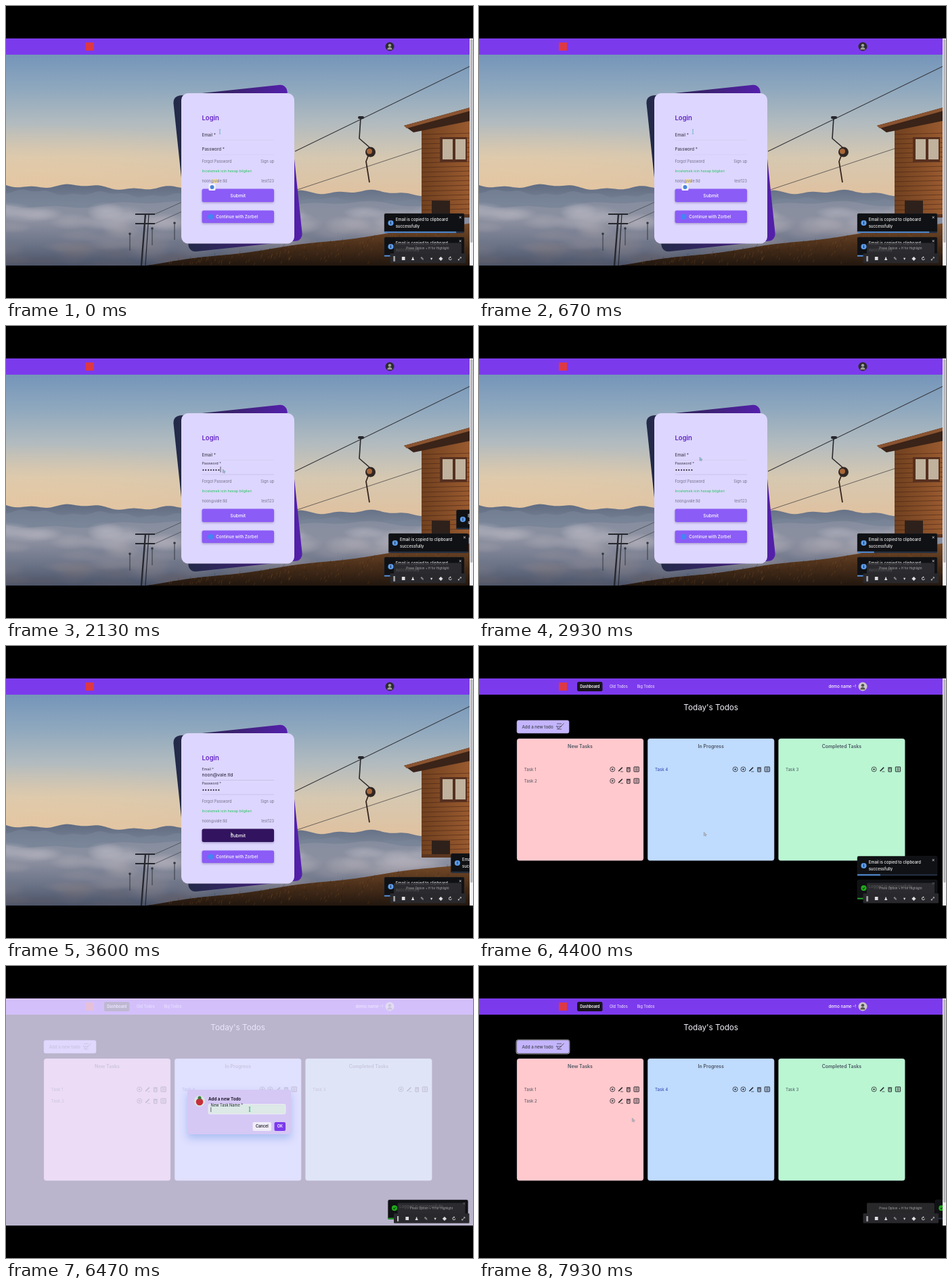
Animation, 690 px wide and 432 px high, one loop 8 s. Source, as an HTML page with a canvas:

```html
<!DOCTYPE html>
<html lang="en">
<head>
<meta charset="utf-8">
<title>Todo login</title>
<style>
html, body { margin: 0; width: 100%; height: 100%; overflow: hidden; background: #000; }
canvas { display: block; }
</style>
</head>
<body>
<canvas id="stage" width="690" height="432"></canvas>
<script>
const stage = document.getElementById('stage');
let c = stage.getContext('2d');
const LOOP = 8000, DASHBOARD_AT = 4130, OPEN_AT = 5850, CLOSE_AT = 7350;
const TOP = 48, NAV_BOTTOM = 72, BOTTOM = 384, WIDTH = 690;
const EMAIL = 'noon@vale.tld', USER = 'demo name';

const ramp = (t, from, duration) => Math.max(0, Math.min(1, (t - from) / duration));
const smooth = p => p * p * (3 - 2 * p);
const mix = (a, b, p) => a + (b - a) * p;
const random = (seed => () => (seed = seed * 16807 % 2147483647) / 2147483647)(71);

function paint(fill, stroke, width = 0.8) {
  if (fill) { c.fillStyle = fill; c.fill(); }
  if (stroke) { c.strokeStyle = stroke; c.lineWidth = width; c.stroke(); }
}
function rect(x, y, w, h, fill, r = 0, stroke, width) {
  c.beginPath();
  c.roundRect(x, y, w, h, r);
  paint(fill, stroke, width);
}
function disc(x, y, r, fill, stroke, width) {
  c.beginPath();
  c.arc(x, y, r, 0, 7);
  paint(fill, stroke, width);
}
function trace(points) {
  c.beginPath();
  for (let i = 0; i < points.length; i += 2) c.lineTo(points[i], points[i + 1]);
}
function poly(fill, ...points) { trace(points); paint(fill); }
function line(stroke, width, ...points) { trace(points); paint(null, stroke, width); }
function text(s, x, y, size, fill, weight = 400, align = 'left') {
  c.font = `${weight} ${size}px Inter, "DejaVu Sans", sans-serif`;
  c.textAlign = align;
  c.fillStyle = fill;
  c.fillText(s, x, y);
}
function gradient(x0, y0, x1, y1, ...stops) {
  const g = c.createLinearGradient(x0, y0, x1, y1);
  stops.forEach((color, i) => g.addColorStop(i / (stops.length - 1), color));
  return g;
}
function glow(x, y, rx, ry, rgb, alpha) {
  c.save();
  c.translate(x, y);
  c.scale(rx, ry);
  const g = c.createRadialGradient(0, 0, 0, 0, 0, 1);
  g.addColorStop(0, `rgba(${rgb},${alpha})`);
  g.addColorStop(0.5, `rgba(${rgb},${alpha * 0.65})`);
  g.addColorStop(1, `rgba(${rgb},0)`);
  c.fillStyle = g;
  c.fillRect(-1, -1, 2, 2);
  c.restore();
}
// Fills everything below the curve y = height(x).
function ridge(fill, height) {
  c.beginPath();
  c.moveTo(0, BOTTOM);
  for (let x = 0; x <= WIDTH; x += 3) c.lineTo(x, height(x));
  c.lineTo(WIDTH, BOTTOM);
  paint(fill);
}

function paintSky() {
  rect(0, NAV_BOTTOM, WIDTH, 312, gradient(0, NAV_BOTTOM, 0, 275, '#7495ba', '#8fa8be', '#b2bbbf', '#d6c8b1', '#dfc2a1'));
  glow(40, 250, 330, 75, '240,205,160', 0.4);
  const peaks = x => 265 + x * 0.02 + 2.5 * Math.sin(x / 23) + 1.5 * Math.sin(x / 8);
  ridge(gradient(0, 262, 0, 296, '#5f6a80', '#7c8799'), peaks);
  ridge('rgba(122,134,154,.6)', x => peaks(x * 1.3 + 60) + 8);
  ridge(gradient(0, 288, 0, BOTTOM, 'rgba(150,152,166,.4)', '#8a8e9e', '#6c7488', '#4a5368'),
    x => 294 + 4 * Math.sin(x / 47) + 2 * Math.sin(x / 15));
  for (let i = 0; i < 110; i++) {
    const depth = i / 110, tone = Math.round(mix(208, 92, depth));
    glow(random() * 640, mix(297, 378, depth) + random() * 14, mix(22, 50, random()), mix(8, 15, random()),
      `${tone},${tone - 4},${tone + 6}`, 0.38);
  }
}

function paintHill() {
  const height = x => Math.min(BOTTOM, BOTTOM - 0.13 * (x - 200) + Math.sin(x / 25));
  ridge(gradient(0, 320, 0, BOTTOM, '#7a4c28', '#4e311b', '#22170f'), height);
  for (let i = 0; i < 260; i++) {
    const x = mix(240, 685, random()), y = mix(height(x), BOTTOM, random());
    line(i % 2 ? 'rgba(151,100,45,.35)' : 'rgba(31,22,13,.35)', 0.7, x, y, x + 1.5, y - 4);
  }
}

function paintSkiLift() {
  const dark = '#26282e';
  line('#343439', 1.1, 690, 87, 427, 215);
  line('#494746', 0.8, 614, 211, 427, 273);
  line(dark, 2.4, 206, 308, 200, BOTTOM);
  line(dark, 1.2, 211, 308, 206, BOTTOM);
  for (const y of [308, 322]) {
    line(dark, 2, 191, y, 220, y);
    line('#464953', 0.8, 220, y, 260, y - 18);
  }
  for (let i = 0; i < 3; i++) {
    const x = 183 + i * 33, y = 337 - i * 8;
    line('#343841', 1, x, y, x, y + 25);
    disc(x, y, 1.8, '#343841');
  }
  rect(520, 163, 9, 4, dark, 2);
  line('#29272a', 1.6, 524, 165, 522, 196, 537, 209);
  disc(538.5, 216, 7.5, '#302723');
  disc(537, 215, 4, '#a8663a');
  line('#38271f', 1.8, 535, 222, 532, 230, 537, 261);
}

function paintHut() {
  poly(gradient(614, 0, WIDTH, 0, '#70401f', '#9c5c30'), 614, 180, WIDTH, 160, WIDTH, 310, 614, 310);
  for (let y = 190; y < 308; y += 7) line('rgba(65,33,21,.6)', 0.9, 614, y, WIDTH, y - 2);
  poly('#3a2318', 588, 177, WIDTH, 149, WIDTH, 169, 602, 187);
  poly('#8a5431', 588, 177, WIDTH, 149, WIDTH, 154, 592, 181);
  rect(641, 194, 40, 37, '#57301f');
  for (const x of [645, 664]) rect(x, 197, 15, 30, '#c0b29d');
  rect(629, 288, 27, 24, '#2e211b');
  rect(614, 308, 76, 5, '#5a3620');
}

function paintScenery() {
  const canvas = document.createElement('canvas');
  canvas.width = stage.width;
  canvas.height = stage.height;
  const main = c;
  c = canvas.getContext('2d');
  paintSky();
  paintHill();
  paintSkiLift();
  paintHut();
  c = main;
  return canvas;
}
const scenery = paintScenery();

function avatar(light) {
  const ink = light ? '#57534f' : '#a39d98';
  disc(567, 60, 6.5, light ? '#c9c8ca' : '#292d30');
  disc(567, 58.3, 2.2, ink);
  c.beginPath();
  c.arc(567, 64.5, 3.6, Math.PI, 0);
  paint(ink);
}

function navbar(loggedIn) {
  rect(0, TOP, WIDTH, NAV_BOTTOM - TOP, '#7c3aed');
  rect(118, 54, 12, 12, '#df3843');
  avatar(loggedIn);
  if (!loggedIn) return;
  rect(145, 53, 37.5, 14, '#18151f', 2.5);
  text('Dashboard', 163.8, 61.9, 5.5, '#fff', 600, 'center');
  text('Old Todos', 193, 61.9, 5.5, '#e4d8ff', 500);
  text('Big Todos', 233.5, 61.9, 5.5, '#e4d8ff', 500);
  text(USER + ' -!', 557, 62, 6.1, '#fff', 500, 'right');
}

function field(label, y, value, size) {
  if (value) {
    text(label, 289.5, y - 7, 5.2, '#4d4860', 500);
    text(value, 289.5, y + 2.4, size, '#211c30');
  } else text(label, 289.5, y + 2, 6.1, '#454153', 500);
  line(value ? '#bdb5d7' : '#d3cbee', 0.6, 289.5, y + 7.5, 396, y + 7.5);
}

function formButton(y, h, fill) {
  c.save();
  c.shadowColor = 'rgba(50,30,100,.3)';
  c.shadowBlur = 3;
  c.shadowOffsetY = 1.5;
  rect(289.5, y, 106.5, h, fill, 2.5);
  c.restore();
}

function login(t) {
  const muted = '#75708b', selected = t < 1150;
  c.drawImage(scenery, 0, 0);
  navbar(false);
  c.save();
  c.translate(342.5, 240);
  c.rotate(-Math.PI / 30);
  rect(-84.5, -116, 169, 232, gradient(-84, 0, 84, 0, '#232a48', '#39226c', '#5420ac'), 10);
  c.restore();
  rect(259, 129, 167, 222.5, '#ddd6fe', 10);
  text('Login', 289.5, 169, 9.5, '#6425c8', 600);
  field('Email *', 191, t >= 3050 && EMAIL, 6.8);
  field('Password *', 212.3, t >= 2000 && '•'.repeat(7), 6.8);
  if (t >= 2000 && t < 2400) line('#211c30', 0.7, 317, 208, 317, 216.5);
  text('Forgot Password', 289.5, 232, 5.5, muted);
  text('Sign up', 396, 232, 5.5, muted, 400, 'right');
  text('Incelemek icin hesap bilgileri', 289.5, 245.5, 5.4, '#22c55e');
  if (selected) rect(305, 256, 8.5, 6, '#f5df9c', 1);
  text(EMAIL, 289.5, 261.2, 5.5, muted);
  text('test123', 396, 261.2, 5.5, muted, 400, 'right');
  formButton(270.5, 19.5, t > 3330 ? '#32135f' : '#8b5cf6');
  text('Submit', 342.7, 282.7, 6.8, '#fff', 500, 'center');
  formButton(302.5, 18.5, '#8b5cf6');
  disc(302.5, 311.7, 4, '#4285f4');
  text('Continue with Zorbel', 310.3, 313.8, 6.2, '#fff', 500);
  if (selected) {
    rect(299.5, 263, 10, 10, '#f4f4fb', 1.5);
    disc(304.5, 268, 3, '#4b84d8');
  }
}

const INK = '#25262d';
const taskIcons = [
  function details(x, y) {
    rect(x - 3.6, y - 3.5, 7.2, 7, null, 0.3, INK, 1);
    for (const dy of [-1.7, 0, 1.7]) line(INK, 0.7, x - 2, y + dy, x + 2.2, y + dy);
  },
  function remove(x, y) {
    line(INK, 1, x - 3, y - 2.4, x + 3, y - 2.4);
    rect(x - 2.2, y - 1.7, 4.4, 5.3, null, 0.8, INK, 1.1);
    line(INK, 0.8, x, y - 0.5, x, y + 2);
  },
  function edit(x, y) {
    line(INK, 1.5, x - 2.8, y + 2.8, x + 2.8, y - 2.8);
    line(INK, 0.7, x, y + 3.5, x + 4, y + 3.5);
  },
  function move(x, y) {
    disc(x, y, 3.5, null, INK);
    line(INK, 0.8, x - 1.6, y, x + 1.6, y);
    line(INK, 0.8, x, y - 1.6, x, y + 1.6);
  }
];

function column(index, title, fill, tasks, iconCount, color) {
  const x = 56 + index * 193.2, width = 187;
  rect(x, 137, width, 180.5, fill, 3.5, 'rgba(120,125,145,.55)', 0.6);
  text(title, x + width / 2, 150.5, 7, '#4b5563', 600, 'center');
  tasks.forEach((task, row) => {
    const y = 182.4 + row * 17.2;
    text(task, x + 10.7, y + 2.3, 6.2, color);
    for (let i = 0; i < iconCount; i++) taskIcons[Math.min(i, 3)](x + width - 10.4 - i * 11.8, y);
  });
}

function dashboard(t) {
  rect(0, TOP, WIDTH, BOTTOM - TOP, '#000');
  navbar(true);
  text("Today's Todos", 342.7, 95, 11.7, '#f4f0fa', 400, 'center');
  rect(56, 110, 77, 19, '#c4b5fd', 2.5, '#aaa0d4', 0.6);
  if (t >= CLOSE_AT) rect(55, 109.2, 78.8, 20.8, null, 3, '#aaa8ae', 1);
  text('Add a new todo', 63.5, 121.6, 6.2, '#41434f', 500);
  line('#454654', 0.9, 114, 118, 117.5, 122.5, 125.5, 114.5);
  for (let y = 115; y < 125; y += 4) line('#454654', 0.8, 115, y, 122, y);
  column(0, 'New Tasks', '#ffc9cd', ['Task 1', 'Task 2'], 4, '#4b5563');
  column(1, 'In Progress', '#bfdbfe', ['Task 4'], 5, '#2b3fae');
  column(2, 'Completed Tasks', '#baf6d2', ['Task 3'], 4, '#4b5563');
}

function dialog(alpha) {
  c.save();
  c.globalAlpha = alpha;
  rect(0, TOP, WIDTH, BOTTOM - TOP, 'rgba(233,225,255,.8)');
  c.shadowColor = 'rgba(105,150,225,.45)';
  c.shadowBlur = 12;
  c.shadowOffsetY = 6;
  rect(268, 183, 153, 66, '#d5c8f5', 3);
  c.shadowColor = 'transparent';
  disc(286, 200, 8.2, '#d9e5df');
  disc(286, 201, 5.3, '#c62f3a');
  disc(286, 195, 2.5, '#3d7a41');
  text('Add a new Todo', 299, 198.7, 6.2, '#201a2b', 700);
  rect(299, 204.5, 114, 14.5, '#dce9e6', 2, '#f1eef8');
  text('New Task Name *', 302.5, 208.2, 5.6, '#354149', 500);
  line('#252d35', 0.7, 302.8, 209, 302.8, 216);
  rect(364.5, 231, 27.5, 13, '#f0edf8', 2);
  text('Cancel', 378.3, 239.4, 5.6, '#211c2a', 600, 'center');
  rect(396.5, 231, 16.5, 13, '#7c3aed', 2);
  text('OK', 404.8, 239.4, 5.6, '#fff', 600, 'center');
  c.restore();
}

// The progress bar runs from countdown until leave.
const makeToast = (enter, leave, countdown = enter, loggedIn = false) => ({ enter, leave, countdown, loggedIn });
const toasts = [
  makeToast(-900, 1950, 700),
  makeToast(-500, 2087, 700),
  makeToast(1300, 3427),
  makeToast(2700, 5200),
  makeToast(4250, 7743, 4250, true)
];

function toast({ enter, leave, countdown, loggedIn }, y, t, shift) {
  const slide = 130 * ramp(t, leave, 200) ** 2 + 130 * (1 - ramp(t, enter, 150)) ** 3;
  const x = 559 + shift + slide, textX = x + 16.7;
  const accent = loggedIn ? '#20a91b' : '#5b9bea';
  const iconY = y + (loggedIn ? 12.2 : 14);
  rect(x, y, 118, 28.5, '#101114', 2, '#24252a', 0.4);
  disc(x + 9.5, iconY, 4.1, accent);
  text(loggedIn ? '✓' : 'i', x + 9.5, iconY + 2, 5.5, '#101114', 700, 'center');
  const lines = loggedIn ? ['Logged in successfully'] : ['Email is copied to clipboard', 'successfully'];
  lines.forEach((s, i) => text(s, textX, iconY - 2.6 * lines.length + 2.6 + i * 9.2, 5.9, '#f1f1f1', 500));
  text('×', x + 112.3, y + 8.2, 7.5, '#d5d5d8', 400, 'center');
  const remaining = 0.9 * (1 - ramp(t, countdown, leave - countdown));
  rect(x, y + 26.7, 118, 1.8, '#25344b');
  rect(x, y + 26.7, 118 * remaining, 1.8, accent);
}

function recorderBar(shift) {
  rect(573 + shift, 350.5, 100, 16, 'rgba(49,49,53,.82)', 1.5);
  text('Press Option + H for Highlight', 623 + shift, 360, 4.5, '#a9a9ad', 400, 'center');
  rect(567.5 + shift, 366, 111.5, 14.5, '#29292d', 1);
  [...'‖■♟✎▾◆↻⤢'].forEach((icon, i) =>
    text(icon, 573.5 + i * 13.8 + shift, 375.6, 6.5, '#dedee0', 700, 'center'));
}

// The pointer reaches each stop at the given time.
const pointerStops = [
  { at: 0, x: 316, y: 186 },
  { at: 1150, x: 386, y: 259 },
  { at: 1750, x: 322, y: 215 },
  { at: 2600, x: 308, y: 259 },
  { at: 3000, x: 330, y: 190 },
  { at: 3400, x: 334, y: 278.5 },
  { at: 5400, x: 100, y: 120 },
  { at: 6250, x: 360, y: 212 },
  { at: 7250, x: 378, y: 238 },
  { at: 7800, x: 228, y: 228 }
];

function pointerAt(t) {
  return pointerStops.reduce((from, to) => {
    const p = smooth(ramp(t, to.at - 350, 350));
    return { x: mix(from.x, to.x, p), y: mix(from.y, to.y, p) };
  });
}

function pointer(t) {
  const { x, y } = pointerAt(t);
  const inDialog = t > 6150 && t < 7000;
  c.save();
  c.translate(x, y);
  if (t < 950 || inDialog) {
    const color = inDialog ? '#36b77b' : '#80b7d4';
    line(color, 1.2, 0, -3, 0, 3);
    for (const end of [-3.3, 3.3]) line(color, 0.8, -1.3, end, 1.3, end);
  } else {
    trace([-1.7, -3, -1.7, 2.4, -0.4, 1.3, 1, 3.2, 0.8, 0.9, 2.4, 0.7]);
    c.closePath();
    paint(t < 3200 ? '#8fc4d3' : '#b8bdc7', '#717783', 0.4);
  }
  c.restore();
}

function draw(t) {
  rect(0, 0, WIDTH, 432, '#000');
  c.save();
  c.beginPath();
  c.rect(0, TOP, WIDTH, BOTTOM - TOP);
  c.clip();
  if (t < DASHBOARD_AT) login(t); else dashboard(t);
  const modal = t >= OPEN_AT && t < CLOSE_AT + 150;
  if (modal) dialog(ramp(t, OPEN_AT, 150) * (1 - ramp(t, CLOSE_AT, 150)));
  const shift = modal ? 5.5 : 0;
  const active = toasts.filter(item => t >= item.enter && t < item.leave + 200);
  const lowest = active.some(item => item.loggedIn) ? 346 : 342;
  active.reverse().forEach((item, i) => toast(item, lowest - 35 * i, t, shift));
  recorderBar(shift);
  if (!modal) {
    rect(685, TOP, 5, BOTTOM - TOP, '#f3f2f5');
    rect(686, 49, 3.5, 301, '#b8b7bc', 1.5);
  }
  pointer(t);
  c.restore();
}

const start = performance.now();
function tick() {
  draw((performance.now() - start) % LOOP);
  requestAnimationFrame(tick);
}
tick();
</script>
</body>
</html>
```
